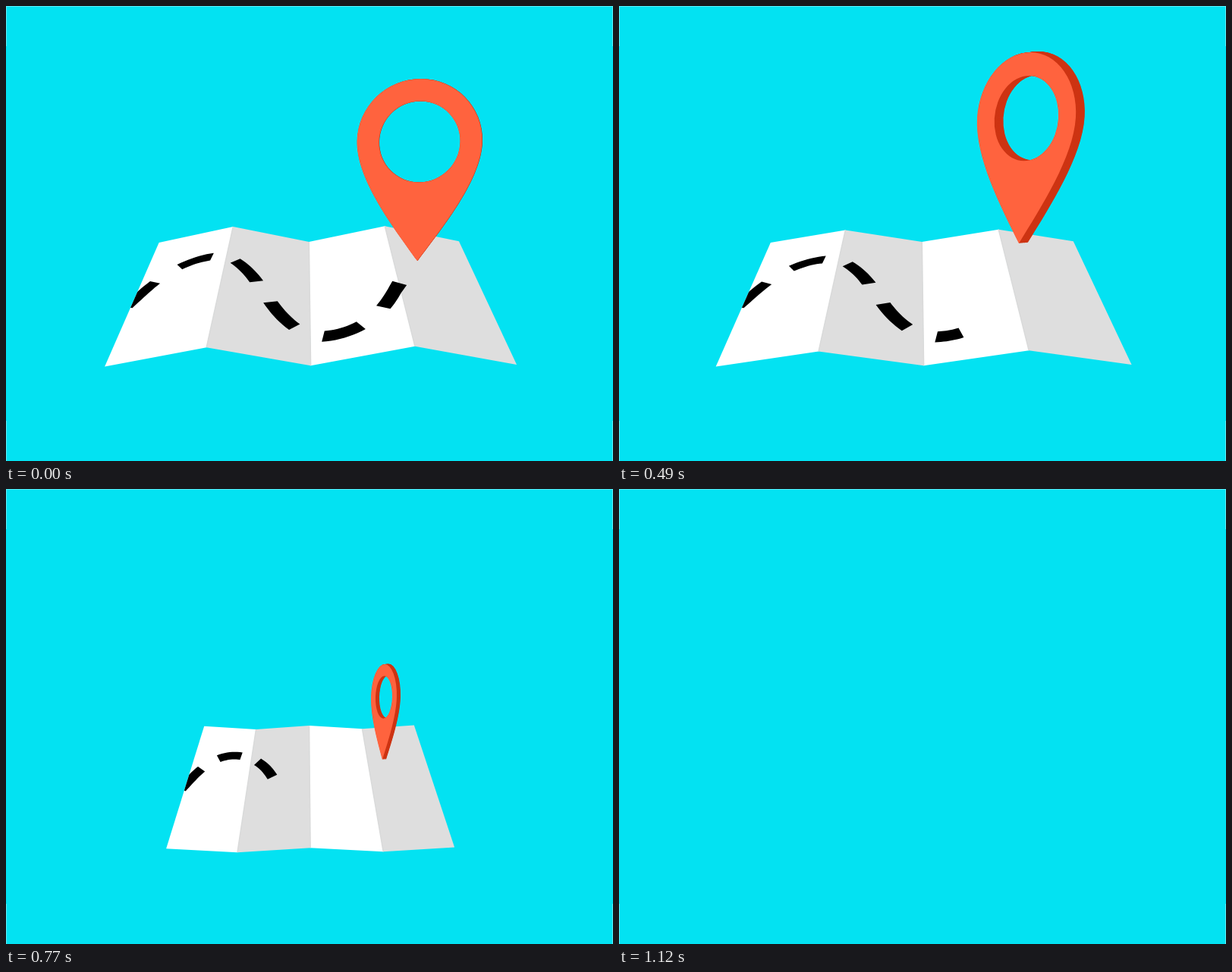
An HTML page with a canvas for the animation above (1.26 s loop, 800x600 px).

```html
<!DOCTYPE html>
<html lang="en">
<head>
<meta charset="utf-8">
<title>Folding map</title>
<style>
html, body { margin: 0; width: 100%; height: 100%; overflow: hidden; background: #03e2f2; }
canvas { display: block; }
</style>
</head>
<body>
<canvas id="stage" width="800" height="600"></canvas>
<script>
const ctx = document.getElementById('stage').getContext('2d');
const LOOP = 1260, STEP = 70, END = 16;
const SKY = '#03e2f2', FACE = '#ff633e', SIDE = '#cd3413';
const OPEN = 543;            // sheet width at rest
const TAPER = 0.728;         // far edge / near edge
const FOLD_X = 0.506;        // outer folds, as a share of the half width

// Key poses; steps in between follow a smooth curve
const keyAt = [3, 5, 7, 9, 10, 11, 12, END];
const keys = {
  width:  [OPEN, 544, 548, 532, 470, 380, 275, 0],
  fold:   [20.5, 19.7, 16, 5.5, 0.3, -4.5, 17.5, 0],
  height: [163, 163, 163, 163, 163, 161, 150, 0],
  pinX:   [542, 539, 527, 528, 517, 496, 470.5, 401],
  pinY:   [336, 322.5, 313, 334, 347, 357, 364, 393],
  scale:  [1, 1, 1.05, 0.895, 0.725, 0.525, 0.32, 0],
  turn:   [2, 9, 42, 123.5, 178, 236, 292, 470],
  lean:   [3, 4, 10, 6.5, 3, 2, 1, 0],
  trail:  [5.55, 5.27, 4.35, 3.58, 2.9, 2.6, 2.36, 0]
};

const mix = (a, b, k) => a + (b - a) * k;
const mixPt = (a, b, k) => [mix(a[0], b[0], k), mix(a[1], b[1], k)];

function smooth(v, n) {
  const last = keyAt.length - 1;
  if (n <= keyAt[0]) return v[0];
  if (n >= keyAt[last]) return v[last];
  const i = keyAt.findIndex(t => t > n) - 1;
  const slope = j => j === 0 || j === last ? 0 : (v[j + 1] - v[j - 1]) / (keyAt[j + 1] - keyAt[j - 1]);
  const span = keyAt[i + 1] - keyAt[i], k = (n - keyAt[i]) / span;
  const ease = k * k * (3 - 2 * k);
  return mix(v[i], v[i + 1], ease)
    + span * k * (1 - k) * ((1 - k) * slope(i) - k * slope(i + 1));
}

function poseAt(n) {
  const pose = {};
  for (const name in keys) pose[name] = smooth(keys[name], n);
  return pose;
}

// Five far and five near corners of the folded sheet
function sheet({ width, fold, height }) {
  const k = width / OPEN;
  const row = (cx, half, y, depth, tilt) => [-1, -FOLD_X, 0, FOLD_X, 1].map((s, i) =>
    [cx + s * half, y - (i % 2) * depth - s * tilt * k]);
  return {
    top: row(400 - 0.7 * k, width * TAPER / 2, 392.6 - height / 2, fold, 0.8),
    bottom: row(400 + 1.6 * k, width / 2, 392.8 + height / 2, fold * 1.21, 1.3)
  };
}

// u counts panels from the left, s runs from the far to the near edge in perspective
function onSheet({ top, bottom }, u, s) {
  const i = Math.max(0, Math.min(3, Math.floor(u)));
  const v = s * TAPER / (1 - s + s * TAPER);
  return mixPt(mixPt(top[i], top[i + 1], u - i), mixPt(bottom[i], bottom[i + 1], u - i), v);
}

function trace(points) {
  ctx.beginPath();
  points.forEach(p => ctx.lineTo(p[0], p[1]));
  ctx.closePath();
}

// Wavy route over the sheet
const PANEL = 0.41, HALF = 0.035;    // panel width and half line weight, in sheet heights
const PERIOD = 1.165, DASH = 0.645, FIRST = -1.695;

function route(a, side) {
  const at = q => [PANEL * (0.74 + 1.5 / Math.PI * (q + 0.15 * Math.sin(2 * q))), 0.558 - 0.2775 * Math.cos(q)];
  const [x, s] = at(a), [x2, s2] = at(a + 0.001);
  const len = Math.hypot(x2 - x, s2 - s);
  return [(x + side * HALF * (s2 - s) / len) / PANEL, s - side * HALF * (x2 - x) / len];
}

function drawRoute(map, trail) {
  ctx.fillStyle = '#000';
  for (let i = 0; i < trail; i++) {
    const from = FIRST + i * PERIOD;
    const length = Math.min(DASH, (trail - i) * PERIOD);
    const edge = side => Array.from({ length: 11 }, (_, j) =>
      onSheet(map, ...route(from + length * j / 10, side)));
    trace([...edge(1), ...edge(-1).reverse()]);
    ctx.fill();
  }
}

function drawMap(pose) {
  const map = sheet(pose), { top, bottom } = map;
  for (let i = 0; i < 4; i++) {
    trace([top[i], top[i + 1], bottom[i + 1], bottom[i]]);
    ctx.fillStyle = i % 2 ? '#dedede' : '#fff';
    ctx.fill();
  }
  ctx.strokeStyle = '#dadada';
  ctx.lineWidth = 1.5;
  for (let i = 1; i < 4; i++) {
    ctx.beginPath();
    ctx.moveTo(...top[i]);
    ctx.lineTo(...bottom[i]);
    ctx.stroke();
  }
  ctx.save();
  trace([...top, ...bottom.slice().reverse()]);
  ctx.clip();
  drawRoute(map, pose.trail);
  ctx.restore();
}

// Pin ring with its tip at x, y
function ring(x, y, pose, thin, color) {
  const s = pose.scale;
  ctx.save();
  ctx.transform(thin * s, 0, -pose.lean / 158, s, x, y);
  ctx.beginPath();
  ctx.moveTo(0, 0);
  ctx.bezierCurveTo(-34, -46, -82.5, -108, -82.5, -158);
  ctx.ellipse(0, -158, 82.5, 82, 0, Math.PI, 2 * Math.PI);
  ctx.bezierCurveTo(82.5, -108, 34, -46, 0, 0);
  ctx.closePath();
  ctx.moveTo(53.5, -157);
  ctx.ellipse(0, -157, 53.5, 53.5, 0, 0, 2 * Math.PI);
  ctx.restore();
  ctx.fillStyle = color;
  ctx.fill('evenodd');
}

// Stacked rings give the turned pin its thickness
function drawPin(pose) {
  const a = pose.turn * Math.PI / 180;
  const squeeze = pose.width / OPEN;
  const thin = Math.abs(Math.cos(a)) * squeeze;
  const depth = 16.5 * pose.scale * squeeze * Math.sin(a) * Math.sign(Math.cos(a));
  const layers = Math.ceil(Math.abs(depth) * 2);
  for (let i = layers; i > 0; i--) {
    const d = depth * i / layers;
    ring(pose.pinX + d, pose.pinY - Math.abs(d) * 0.08, pose, thin, SIDE);
  }
  ring(pose.pinX, pose.pinY, pose, thin, FACE);
}

function drawBackground() {
  ctx.fillStyle = SKY;
  ctx.fillRect(0, 0, 800, 600);
  ctx.fillStyle = 'rgba(255,255,255,0.35)';
  ctx.fillRect(0, 0, 800, 1);
  for (const x of [0, 799]) {
    ctx.fillRect(x, 1, 1, 52);
    ctx.fillRect(x, 547, 1, 53);
  }
}

function draw(time) {
  const n = Math.floor((time % LOOP) / STEP);
  drawBackground();
  if (n >= END) return;
  const pose = poseAt(n);
  drawMap(pose);
  drawPin(pose);
}

const start = performance.now();
function tick() {
  draw(performance.now() - start);
  requestAnimationFrame(tick);
}
tick();
</script>
</body>
</html>
```
